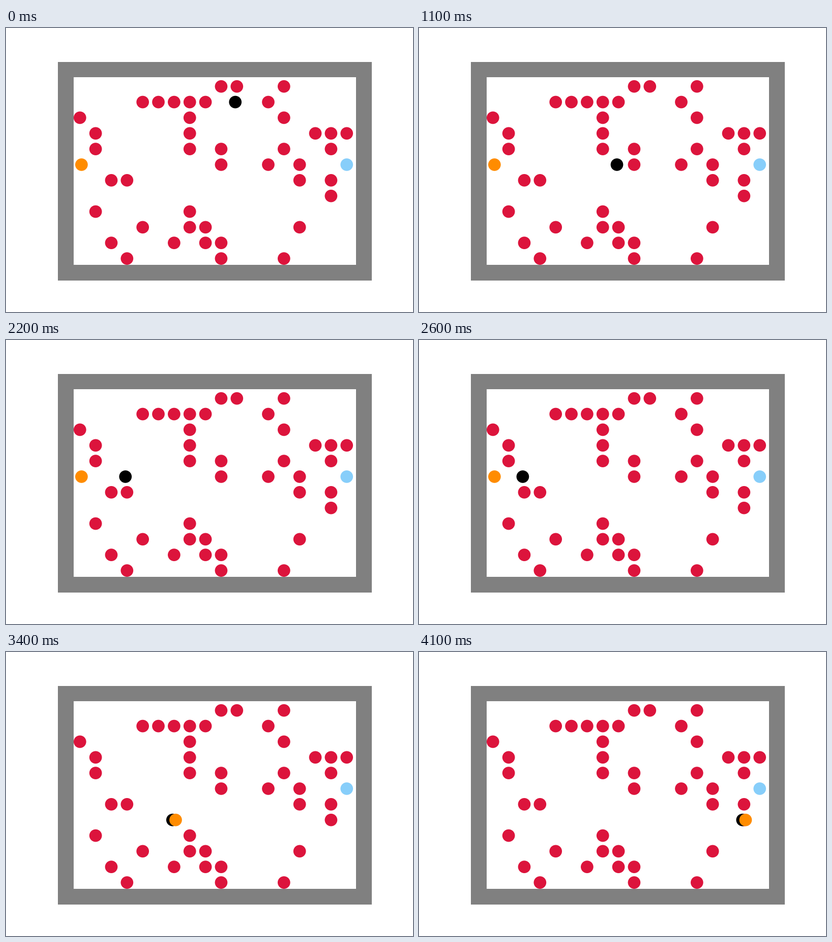
Animation of 800 by 560 pixels, one loop 4200 ms. Source, as a matplotlib script:

```python
import matplotlib.pyplot as plt
from matplotlib.animation import FuncAnimation
from matplotlib.patches import Circle, Rectangle

W, H, DPI = 800, 560, 100
CELL = 30.85
LEFT, TOP = 132.95, 96.7
RADIUS = 0.4 * CELL

# columns of the obstacles in each row, top to bottom
OBSTACLES = [
    (9, 10, 13), (4, 5, 6, 7, 8, 12), (0, 7, 13), (1, 7, 15, 16, 17),
    (1, 7, 9, 13, 16), (9, 12, 14), (2, 3, 14, 16), (16,),
    (1, 7), (4, 7, 8, 14), (2, 6, 8, 9), (3, 9, 13),
]
GOAL = (17, 5)
ITEM = (0, 5)


def along(row, cols):
    return [(col, row) for col in cols]


# one cell per frame; a repeated cell is a pause
PATH = (
    [(10, 1), (11, 1), (11, 2), (10, 2)]
    + along(3, [10, 9, 9, 10, 9, 8])
    + [(8, 4)]
    + along(5, [8, 7, 6, 5, 4, 4])
    + along(5, [3, 2, 1, 3, 2, 3])
    + along(5, [2, 1, 3, 2, 1, 0])
    + [(0, 6)]
    + along(7, [0, 1, 3, 4, 6])
    + along(7, [7, 9, 10, 11, 13, 14, 16])
)
PICKUP = PATH.index(ITEM)


def center(cell, shift):
    col, row = cell
    return LEFT + (col + shift) * CELL, TOP + (row + 0.6) * CELL


fig = plt.figure(figsize=(W / DPI, H / DPI), dpi=DPI, facecolor="white")
ax = fig.add_axes([0, 0, 1, 1])
ax.set_xlim(0, W)
ax.set_ylim(H, 0)
ax.axis("off")


def box(x0, y0, x1, y1, color):
    ax.add_patch(Rectangle((x0, y0), x1 - x0, y1 - y0, color=color, lw=0))


def disc(cell, color, shift=0.4, z=2):
    return ax.add_patch(
        Circle(center(cell, shift), RADIUS, fc=color, ec="none", zorder=z))


box(102, 67, 719, 498, "gray")
box(133, 97, 688, 467, "white")
for row, cols in enumerate(OBSTACLES):
    for col in cols:
        disc((col, row), "crimson")
disc(GOAL, "lightskyblue")
robot = disc(PATH[0], "black", 0.3, 3)
item = disc(ITEM, "darkorange", 0.5, 4)


def update(i):
    robot.center = center(PATH[i], 0.3)
    item.center = center(PATH[i] if i >= PICKUP else ITEM, 0.5)
    return robot, item


anim = FuncAnimation(fig, update, frames=len(PATH), interval=100,
                     repeat=True, repeat_delay=0)
plt.show()
```
